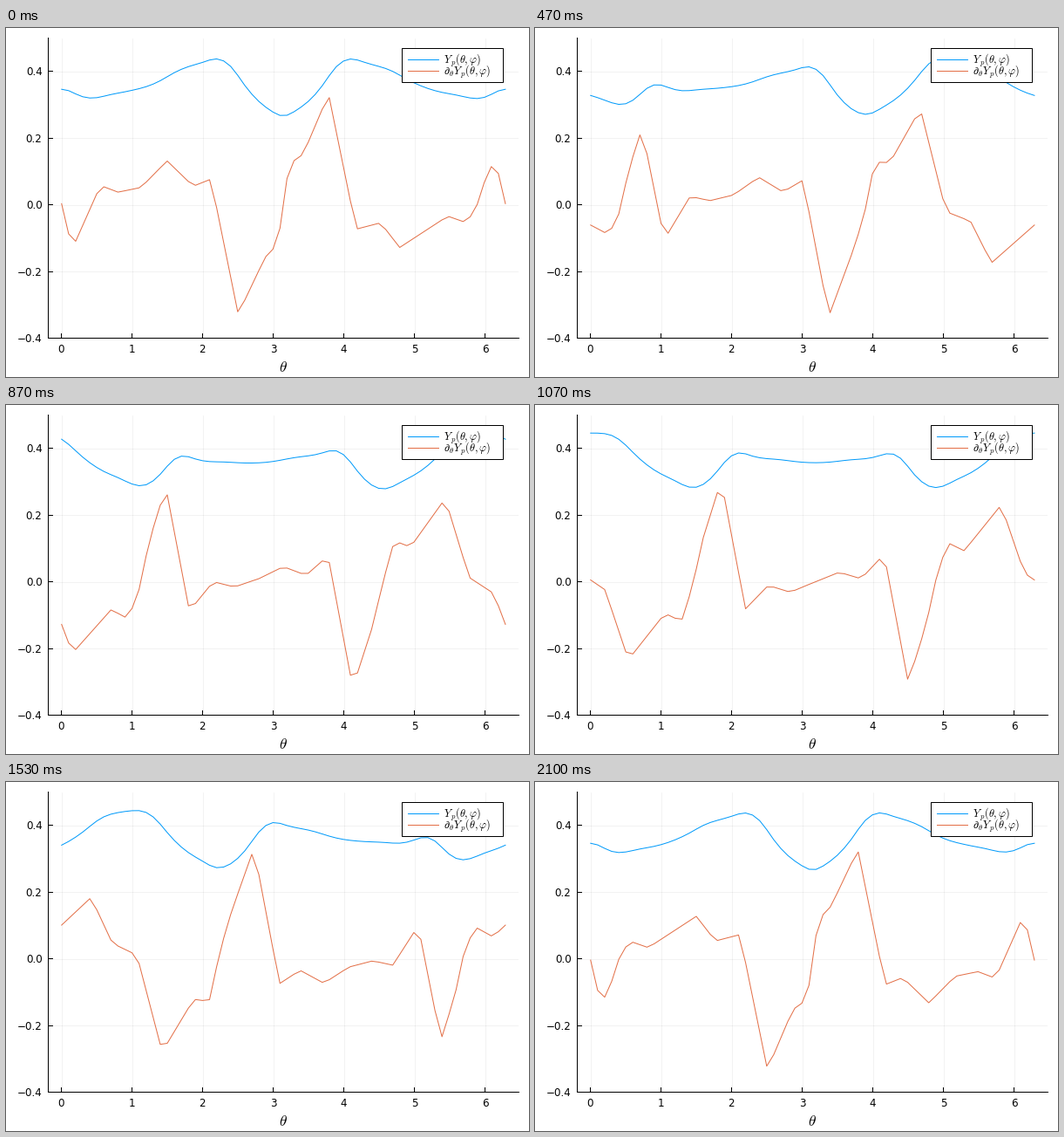
A matplotlib script that plays this animation: 600 by 400 pixels, repeating every 2130 ms.

```python
import numpy as np
import matplotlib.pyplot as plt
from matplotlib.animation import FuncAnimation
from matplotlib.patches import Rectangle

FRAMES, LOOP = 64, 2130
BLUE, ORANGE = "#009afa", "#e36f47"
PX = 0.72  # one pixel in points
MEAN = 0.36
theta = np.linspace(0, 2 * np.pi, 64)

# Corners of the slope curve, each drifting steadily while phi makes one turn:
# angle at start and end, slope at start, middle and end
corners = np.array([
    (0.15, 4.17, -0.135, -0.082, -0.075),
    (0.55, 4.42, 0.056, -0.010, -0.054),
    (0.80, 4.79, 0.036, -0.030, -0.130),
    (1.12, 5.16, 0.050, 0.000, -0.050),
    (2.50, 6.43, -0.330, -0.303, -0.135),
    (2.88, 6.56, -0.160, -0.130, -0.080),
    (3.06, 6.68, -0.120, 0.015, 0.000),
    (3.22, 6.83, 0.120, 0.118, 0.056),
    (3.42, 7.10, 0.150, 0.094, 0.036),
    (3.78, 7.78, 0.330, 0.232, 0.130),
    (4.17, 8.05, -0.075, 0.025, 0.056),
])
# Y(-theta, -phi) = Y(theta, phi), so every corner has a reversed twin
twins = -corners[:, [1, 0, 4, 3, 2]]
begin, end, first, mid, last = np.vstack([corners, twins]).T


def curves(t):
    """Y and its slope over theta, t being the part of the turn done."""
    height = (first * (1 - t) * (1 - 2 * t) + 4 * mid * t * (1 - t)
              + last * t * (2 * t - 1))
    slope = np.interp(theta, begin + (end - begin) * t, height, period=2 * np.pi)
    slope -= slope[:-1].mean()
    rise = (slope[1:] + slope[:-1]) / 2 * theta[1]
    value = np.append(0, np.cumsum(rise))
    return value - value[:-1].mean() + MEAN, slope


plt.rcParams.update({"font.family": "DejaVu Sans", "mathtext.fontset": "cm"})
fig = plt.figure(figsize=(6, 4), dpi=100, facecolor="white")


def layer(box, xlim, ylim):
    ax = fig.add_axes(box)
    ax.set(xlim=xlim, ylim=ylim)
    ax.axis("off")
    return ax


L, R, T, B = 48.5, 588.2, 11.8, 355.5
plot = layer([L / 600, 1 - B / 400, (R - L) / 600, (B - T) / 400],
             (-0.1885, 6.4717), (-0.4, 0.5))
# half a pixel of offset keeps thin lines on the pixel they start in
page = layer([0, 0, 1, 1], (0.5, 600.5), (400.5, 0.5))


def rule(xs, ys, color="black", **kw):
    page.plot(xs, ys, color=color, lw=PX, **kw)


def label(x, y, text, size, ha="center", va="center_baseline", **kw):
    page.text(x, y, text, size=size, ha=ha, va=va, **kw)


grid = dict(color="black", alpha=0.1, lw=0.5 * PX)
for i in range(7):
    x = L + (i + 0.1885) * (R - L) / 6.6602
    plot.axvline(i, **grid)
    rule([x, x], [B, B - 5])
    label(x, 367.5, str(i), 8.6)
for i in range(-2, 3):
    y = B - (i + 2) * (B - T) / 4.5
    plot.axhline(i / 5, **grid)
    rule([L, L + 5], [y, y])
    label(42, y, f"{i / 5:.1f}".replace("-", "\u2212"), 8.6, "right")
rule([L, L, R], [T, B, B])
label(318, 395, r"$\theta$", 12.4, va="baseline")

page.add_patch(Rectangle((454.9, 23.5), 115.5, 38.6, fc="white", ec="black",
                         lw=PX, zorder=3))
for y, color, text in ((36.5, BLUE, r"$Y_{\,p}(\theta,\varphi)$"),
                       (49.5, ORANGE, r"$\partial_\theta Y_{\,p}(\theta,\varphi)$")):
    rule([461, 496.5], [y, y], color, zorder=4)
    label(502, y + 4, text, 8.8, "left", "baseline", zorder=4)

value_line, = plot.plot([], [], color=BLUE, lw=PX)
slope_line, = plot.plot([], [], color=ORANGE, lw=PX)


def draw(i):
    value, slope = curves(i / (FRAMES - 1))
    value_line.set_data(theta, value)
    slope_line.set_data(theta, slope)
    return value_line, slope_line


anim = FuncAnimation(fig, draw, frames=FRAMES, interval=LOOP / FRAMES, repeat=True)
plt.show()
```
